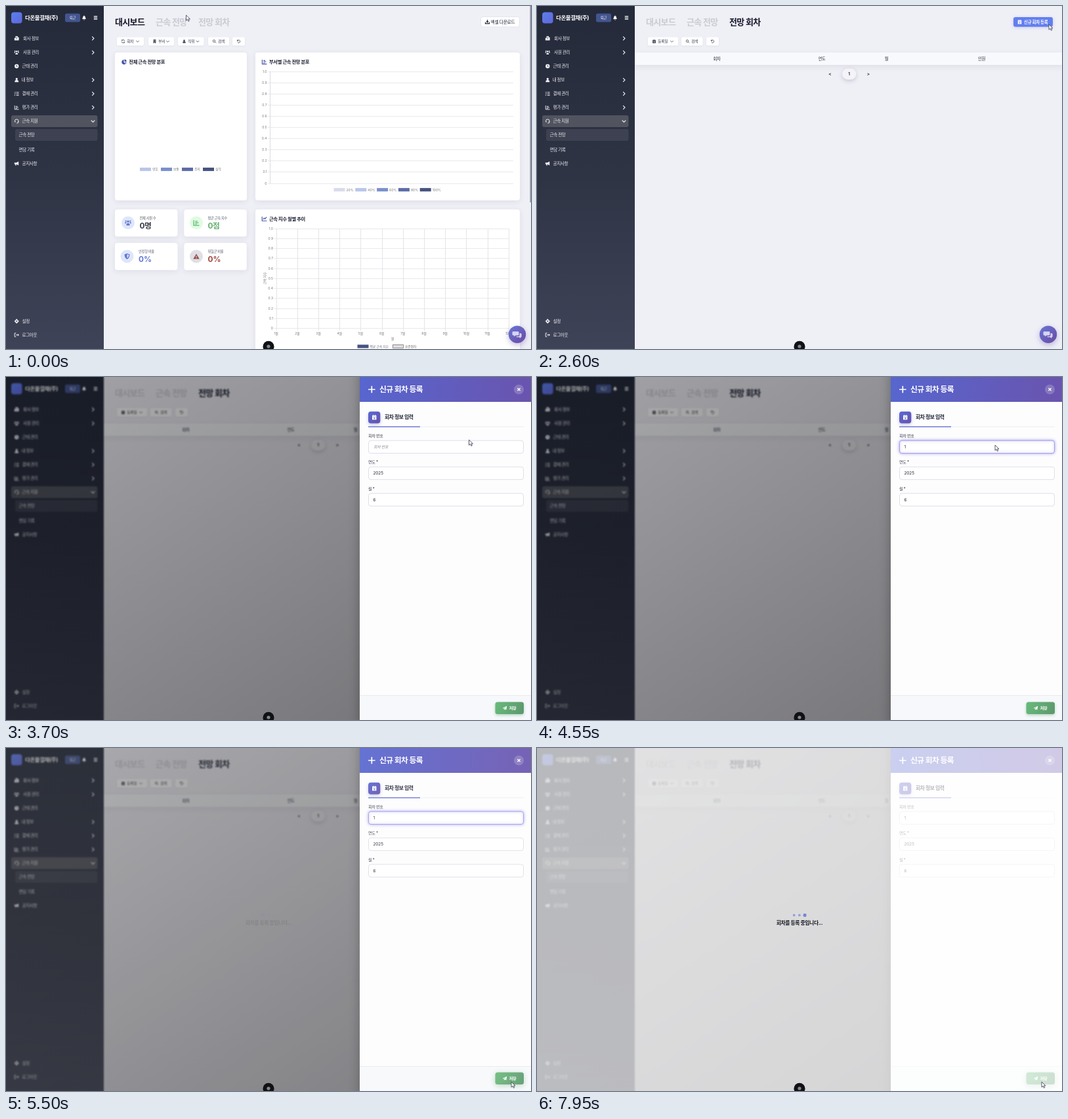
Write an HTML page with a canvas that moves like this. It is 800 by 524 pixels and loops after 8000 ms.

```html
<!DOCTYPE html>
<html lang="ko">
<head>
<meta charset="utf-8">
<style>
html, body { margin: 0; width: 100%; height: 100%; overflow: hidden; background: #efeff6 }
canvas { display: block }
</style>
</head>
<body>
<canvas id="stage" width="800" height="524"></canvas>
<script>
const W = 800, H = 524, LOOP = 8000;
const screen2d = document.getElementById('stage').getContext('2d');
const page2d = new OffscreenCanvas(W, H).getContext('2d');
let c = screen2d;

// ---- drawing helpers ----
const FONT = 'Inter, "Noto Sans CJK KR", "Noto Sans CJK", sans-serif';
const clamp = v => Math.max(0, Math.min(1, v));
const ramp = (t, a, b) => clamp((t - a) / (b - a));
const easeOut = p => 1 - (1 - p) ** 3;
const easeInOut = p => p * p * (3 - 2 * p);

function text(s, x, y, size, color, weight = 400, align = 'left', style = '', font = FONT) {
  c.font = `${style} ${weight} ${size}px ${font}`;
  c.letterSpacing = /[가-힣]/.test(s) ? `${-size * .05}px` : '0px';
  c.textAlign = align;
  c.fillStyle = color;
  c.fillText(s, x, y + size * .37);
}
function shadow(color, blur, dy) {
  c.shadowColor = color; c.shadowBlur = blur; c.shadowOffsetY = dy;
}
const noShadow = () => shadow('transparent', 0, 0);
function box(x, y, x2, y2, r, fill, stroke) {
  c.beginPath();
  c.roundRect(x, y, x2 - x, y2 - y, r);
  if (fill) { c.fillStyle = fill; c.fill(); }
  if (stroke) { c.strokeStyle = stroke; c.lineWidth = 1; c.stroke(); }
}
function raised(x, y, x2, y2, r, fill, color = 'rgba(40,45,90,.1)', blur = 8, dy = 2) {
  shadow(color, blur, dy);
  box(x, y, x2, y2, r, fill);
  noShadow();
}
function circle(x, y, r, fill) {
  c.beginPath(); c.arc(x, y, r, 0, 7); c.fillStyle = fill; c.fill();
}
function line(x, y, x2, y2, color, width = 1) {
  c.beginPath(); c.moveTo(x, y); c.lineTo(x2, y2);
  c.strokeStyle = color; c.lineWidth = width; c.stroke();
}
function gradient(x, y, x2, y2, ...colors) {
  const g = c.createLinearGradient(x, y, x2, y2);
  colors.forEach((col, i) => g.addColorStop(i / (colors.length - 1), col));
  return g;
}

// ---- icons, each in a box of 8 by 8 around its centre ----
const disc = (x, y, r) => `M${x - r} ${y}a${r} ${r} 0 1 0 ${2 * r} 0a${r} ${r} 0 1 0 ${-2 * r} 0z`;
const FILLED = {
  office: 'M-4-1h2v-3h4v2h2v5.5h-8zM-1-2.5h2v1h-2zM-1 0h2v1h-2z',
  tower: 'M-2.7-4h5.4v8h-5.4zM-1.4-2.5h1v1h-1zM.5-2.5h1v1h-1zM-1.4-.4h1v1h-1zM.5-.4h1v1h-1zM-.7 2h1.4v2h-1.4z',
  users: disc(0, -1.8, 1.5) + disc(-3, -2.4, 1) + disc(3, -2.4, 1) + 'M-2.4 3.5a2.4 3 0 0 1 4.8 0zM-4.4 1a1.6 2 0 0 1 2.4-1.8l-.8 1.8zM4.4 1a1.6 2 0 0 0-2.4-1.8l.8 1.8z',
  clock: disc(0, 0, 3.7) + 'M-.5-2.4v2.8l1.8 1.2.5-.8-1.3-.9v-2.3z',
  user: disc(0, -1.9, 1.9) + 'M-3.5 3.7a3.5 3.6 0 0 1 7 0z',
  horn: 'M-4-1.5h3.5l4-2v7l-4-2h-.5l.6 2.3h-1.6l-.7-2.3h-1.3z',
  gear: disc(0, 0, 3) + disc(0, 0, 1.2) + 'M-.8-4h1.6v1.2h-1.6zM-.8 2.8h1.6v1.2h-1.6zM-4-.8h1.2v1.6h-1.2zM2.8-.8h1.2v1.6h-1.2z',
  bell: 'M-3.5 2.4q1.2-1 1.2-3a2.3 2.6 0 0 1 4.6 0q0 2 1.2 3zM-1 3h2a1 1 0 0 1-2 0zM-.5-4h1v1h-1z',
  pie: 'M-.5-3.5v4l3 2.8a3.9 3.9 0 1 1-3-6.8zM.6-4a3.8 3.8 0 0 1 3.4 3.8h-3.4zM.9.8h3a4 4 0 0 1-1 2z',
  shield: 'M0-4l3.5 1.3q0 4.7-3.5 6.7q-3.5-2-3.5-6.7zM0-2.8v5.5q2.3-1.6 2.4-4.6z',
  warn: 'M0-3.6l4.2 7.2h-8.4zM-.5-1h1v2.4h-1zM-.5 2h1v.9h-1z',
  calendar: 'M-3.4-3h1.2v-1h1.1v1h2.2v-1h1.1v1h1.2v7h-6.8zM-2.4-1h4.8v.7h-4.8zM-.4.4h.8v.9h.9v.8h-.9v.9h-.8v-.9h-.9v-.8h.9z',
  plane: 'M4-4l-1.2 7.5-2.8-1.2-1.4 1.7v-2.5l4-4.3-4.8 3.8-1.8-.8z',
  bubbles: 'M-4-3h5a1 1 0 0 1 1 1v2.2a1 1 0 0 1-1 1h-2.6l-1.6 1.3v-1.3h-.8a1 1 0 0 1-1-1v-2.2a1 1 0 0 1 1-1zM2.7-1h1.1a1 1 0 0 1 1 1v2.2a1 1 0 0 1-1 1v1.2l-1.6-1.2h-2.2a1 1 0 0 1-.9-.9h2.4a1.2 1.2 0 0 0 1.2-1.2z'
};
const STROKED = {
  list: 'M-4-2.6l.8.8 1.3-1.5M-4 .2l.8.8 1.3-1.5M-4 3h1.5M-.6-2.5h4.6M-.6.3h4.6M-.6 3h4.6',
  chart: 'M-3.5-3.5v7h7.5M-1.5-2h3M-1.5 0h4.5M-1.5 1.8h2',
  trend: 'M-3.7-3.5v7h7.7M-2 1l1.6-2 1.6 1.2 2.4-3',
  headset: 'M-3.3 1v-1.2a3.3 3.3 0 0 1 6.6 0v1.7q0 2-2.5 2h-.8M-2.5 0v2M2.5 0v2',
  exit: 'M-1-3.2h-2.6v6.4h2.6M-1.5 0h5M1.7-2l2 2-2 2',
  menu: 'M-3.3-2.6h6.6M-3.3 0h6.6M-3.3 2.6h6.6',
  right: 'M-1.5-3.2l3.2 3.2-3.2 3.2',
  down: 'M-3.2-1.5l3.2 3.2 3.2-3.2',
  search: disc(-.7, -.7, 2.5) + 'M1.2 1.2l2.5 2.5',
  reset: 'M-3-3.5v2.5h2.5M-2.8-1.2a3.1 3.1 0 1 1 .4 3.2',
  reload: 'M3.3-.6a3.3 3.3 0 0 0-6-1.4M-3.3.6a3.3 3.3 0 0 0 6 1.4M-3-3.6v2h2M3 3.6v-2h-2',
  download: 'M0-3.8v5M-2-.8l2 2 2-2M-3.7 1v2.6h7.4v-2.6',
  cross: 'M-2.2-2.2l4.4 4.4M2.2-2.2l-4.4 4.4',
  plus: 'M-4 0h8M0-4v8'
};
function icon(name, x, y, size, color, width = 1.1) {
  c.save();
  c.translate(x, y);
  c.scale(size / 8, size / 8);
  c.fillStyle = c.strokeStyle = color;
  c.lineWidth = width;
  if (FILLED[name]) c.fill(new Path2D(FILLED[name]), 'evenodd');
  else c.stroke(new Path2D(STROKED[name]));
  c.restore();
}

// ---- page parts ----
function sidebar() {
  box(0, 0, 149, H, 0, gradient(0, 0, 0, H, '#242a3a', '#2f3445', '#3f4357'));
  box(8, 9.5, 24.5, 26.5, 4, gradient(8, 9, 24, 26, '#5a80ee', '#6068dc'));
  text('다온물결채(주)', 29, 18, 8.5, '#fff', 700);
  box(90, 11.5, 113, 24.5, 2.5, '#435590');
  text('퇴근', 101.5, 18, 5.2, '#fff', 500, 'center');
  icon('bell', 119, 18, 7, '#fff');
  icon('menu', 136.5, 18, 6.5, '#fff', 1.3);
  box(8, 167, 139.5, 185, 3, '#51545f');
  box(14, 188, 139.5, 206, 3, '#3d4151');
  const items = [
    ['office', '회사 정보', 49.5, 26, 'right'], ['users', '사원 관리', 71, 26, 'right'],
    ['clock', '근태 관리', 92, 24.5], ['user', '내 정보', 113, 23.5, 'right'],
    ['list', '결재 관리', 134, 24.5, 'right'], ['chart', '평가 관리', 155, 24.5, 'right'],
    ['headset', '근속 지원', 176, 24.5, 'down'], ['', '근속 전망', 197, 19.5],
    ['', '면담 기록', 219.5, 19.5], ['horn', '공지사항', 240.5, 24.5],
    ['gear', '설정', 481.5, 24.5], ['exit', '로그아웃', 502.5, 24.5]
  ];
  for (const [name, label, y, x, arrow] of items) {
    if (name) icon(name, 16.2, y, 6.8, '#f2f3f7');
    text(label, x, y, 6.5, '#f2f3f7', 500);
    if (arrow) icon(arrow, 132.5, y, 7, '#f2f3f7', 1.3);
  }
}
function tabs(active) {
  ['대시보드', '근속 전망', '전망 회차'].forEach((s, i) =>
    text(s, [166, 228, 293][i], 24, 13, i === active ? '#14182a' : '#cacbd2', 700));
}
function filterButton(x, x2, name, label, arrow) {
  raised(x, 47.5, x2, 60.5, 2, '#fff', 'rgba(40,45,90,.08)', 3, 1);
  icon(name, label ? x + 9.5 : (x + x2) / 2, 54, 5.5, '#33374a');
  if (label) text(label, x + 15.3, 54, 5.7, '#33374a', 500);
  if (arrow) icon('down', x2 - 9.5, 54, 5.5, '#33374a');
}
function cardTitle(name, label, x, y) {
  icon(name, x, y, 7.5, '#4353a8', 1.2);
  text(label, x + 7.3, y, 7.3, '#1d2133', 700);
}
function legend(colors, labels, x, y, step) {
  colors.forEach((color, i) => {
    box(x + i * step, y - 2.6, x + i * step + 17, y + 2.6, 0, color);
    text(labels[i], x + i * step + 19, y, 5, '#777');
  });
}
function yAxis(right, top, step, end) {
  for (let i = 0; i <= 10; i++) {
    const y = Math.round(top + i * step) + .5;
    line(right + 1, y, end, y, '#e9e9ee');
    text(i === 10 ? '0' : (1 - i / 10).toFixed(1), right - .5, y, 5, '#777', 400, 'right');
  }
}
function stat(x, y, cx, tint, name, color, label, value, valueColor) {
  raised(x, y, x + 95.5, y + 41.5, 4, '#fff');
  circle(cx, y + 20.5, 10, tint);
  icon(name, cx, y + 20.5, 9, color);
  text(label, cx + 17.6, y + 13.3, 5.2, '#555a66', 500);
  text(value, cx + 17.6, y + 25, 11.8, valueColor, 700);
}
function dashboard() {
  tabs(0);
  box(723.5, 16.5, 782.5, 32, 3, '#fff', '#e4e5ee');
  icon('download', 733.5, 24, 6.5, '#1d2133', 1.4);
  text('엑셀 다운로드', 738.5, 24, 6.8, '#1d2133', 500);
  filterButton(169, 210, 'reload', '회차', true);
  filterButton(217, 256, 'tower', '부서', true);
  filterButton(262, 301.5, 'user', '직위', true);
  filterButton(308, 340, 'search', '검색');
  filterButton(345, 364, 'reset');

  const blues = ['#d9dbeb', '#b9c6e9', '#7a90cb', '#5c6ca8', '#46527f'];
  raised(166, 71, 367, 297, 4, '#fff');
  cardTitle('pie', '전체 근속 전망 분포', 180, 85.3);
  legend(blues.slice(1), ['양호', '보통', '주의', '심각'], 204, 249.5, 32);

  raised(380, 71, 783, 297, 4, '#fff');
  cardTitle('chart', '부서별 근속 전망 분포', 393.7, 85.3);
  yAxis(398, 100, 17.05, 773);
  line(402.5, 100, 402.5, 271, '#dcdce2');
  legend(blues, ['20%', '40%', '60%', '80%', '100%'], 499.5, 280.7, 32.8);

  stat(166, 310.7, 186, '#dfe6f8', 'users', '#5f78d6', '전체 사원 수', '0명', '#3a3d48');
  stat(271.3, 310.7, 290, '#dffbe2', 'chart', '#5fb56c', '평균 근속 지수', '0점', '#66b070');
  stat(166, 362, 184.5, '#dfe6f8', 'shield', '#5f78d6', '안정형 비율', '0%', '#5f78d6');
  stat(271.3, 362, 290, '#e0dfe5', 'warn', '#96504c', '위험군 비율', '0%', '#a04a45');

  raised(380, 310.7, 783, 560, 4, '#fff');
  cardTitle('trend', '근속 지수 월별 추이', 393.7, 325);
  yAxis(407.5, 339.5, 15.25, 767);
  for (let m = 0; m < 12; m++) {
    const x = 411.5 + m * 32.2;
    line(Math.round(x) + .5, 340, Math.round(x) + .5, 496, '#e4e4ea');
    text(m + 1 + '월', x, 500, 5, '#777', 400, 'center');
  }
  text('월', 589, 508.5, 5, '#777', 400, 'center');
  c.save();
  c.translate(394, 416);
  c.rotate(-Math.PI / 2);
  text('근속 지수', 0, 0, 5, '#777', 400, 'center');
  c.restore();
  legend(['#46527f', '#e0e0e2'], ['평균 근속 지수', '표준편차'], 535.5, 520, 53.5);
  box(589.3, 517.6, 605.7, 522.6, 0, null, '#8a8a8e');
  box(798.5, 0, 800, 300, 0, '#8c90a3');
}
function rounds(hover) {
  tabs(2);
  raised(726, 17, 786, 31.7, 3, hover ? '#637fee' : '#4d5bd8', 'rgba(70,80,200,.25)', 5, 1);
  icon('calendar', 735.5, 24.2, 6.5, '#fff');
  text('신규 회차 등록', 742, 24.2, 6.5, '#fff', 700);
  filterButton(169, 215, 'calendar', '등록일', true);
  filterButton(220, 252.5, 'search', '검색');
  filterButton(258, 277, 'reset');
  raised(149, 71, 801, 90, 0, '#f8f9fc', 'rgba(40,45,90,.09)', 10, 3);
  [['회차', 274], ['연도', 434], ['월', 532.5], ['인원', 677.5]].forEach(([s, x]) =>
    text(s, x, 80.5, 6.4, '#2b2f40', 500, 'center'));
  raised(465, 95.5, 486.5, 112.5, 8.5, '#f3f3f8', 'rgba(40,45,90,.22)', 6, 2);
  [['<', 446.5], ['1', 475.7], ['>', 505]].forEach(([s, x]) =>
    text(s, x, 104, 6.5, '#1d2133', 600, 'center'));
}
function chatButton() {
  shadow('rgba(80,70,170,.35)', 9, 3);
  circle(779, 501.7, 13.2, gradient(768, 490, 790, 514, '#6874d4', '#6c4ca2'));
  noShadow();
  icon('bubbles', 778.7, 501.5, 11.5, '#d5d5f3');
}
function drawPage(t) {
  box(0, 0, W, H, 0, '#efeff6');
  if (t < 700) dashboard();
  else rounds(t > 2200);
  sidebar();
  chatButton();
}

// ---- registration panel ----
function field(label, y, value, focused, hint) {
  text(label, 552, y - 17, 6.1, '#3a3e4c', 500);
  if (focused) shadow('rgba(110,100,230,.55)', 4, 0);
  box(552.5, y - 9.7, 788.5, y + 9.7, 3.5, '#fff', focused ? '#a09ce8' : '#dcdfe9');
  noShadow();
  if (value) text(value, 559.5, y, 6.3, '#22252f');
  else text(hint, 560, y, 6, '#8c8f99', 400, 'left', 'italic');
}
function panel(t) {
  raised(539, -10, 801, H + 10, 0, '#fdfdfe', 'rgba(0,0,0,.3)', 16, 0);
  box(539, 0, 800, 38, 0, gradient(539, 0, 800, 38, '#5766cf', '#6a54ae'));
  icon('plus', 557.3, 19, 10.5, '#fff', 1.3);
  text('신규 회차 등록', 569, 19, 11.8, '#fff', 700);
  circle(781.5, 19, 7.6, 'rgba(255,255,255,.2)');
  icon('cross', 781.5, 19, 7.5, '#fff', 1.4);

  raised(552, 52.7, 570.3, 70.7, 4, gradient(552, 53, 570, 71, '#5a69d0', '#6551ad'), 'rgba(90,90,200,.35)', 5, 2);
  icon('calendar', 561.2, 61.6, 7.5, '#fff');
  text('회차 정보 입력', 577, 61.6, 7.8, '#1d2133', 700);
  line(552, 76, 789, 76, '#ebecf2');
  line(552, 76, 631, 76, '#6f7bd3', 1.4);
  field('회차 번호', 106.8, t > 4550 ? '1' : '', t > 3950 && t < 5560, '회차 번호');
  field('연도 *', 147, '2025');
  field('월 *', 187.5, '6');

  box(539, 486, 800, H, 0, '#f7f8fb');
  line(539, 486.5, 800, 486.5, '#e8eaf0');
  const lift = ramp(t, 5220, 5380);
  c.save();
  c.translate(0, -lift);
  raised(745.5, 496.5, 789, 515, 3.5, gradient(745, 496, 789, 515, '#69bb7b', '#5c976d'), 'rgba(70,150,90,.35)', 4 + 4 * lift, 2);
  icon('plane', 760, 505.7, 6.5, '#fff');
  text('저장', 766.7, 505.7, 6.2, '#fff', 700);
  c.restore();
}

// ---- loading layer ----
function loading(t, alpha) {
  c.save();
  c.globalAlpha = alpha;
  box(0, 0, W, H, 0, 'rgba(255,255,255,.69)');
  for (let i = 0; i < 3; i++) {
    const phase = (((t - 6475 - i * 200) % 1000) + 1500) % 1000 - 500;
    const pulse = easeInOut(clamp(1 - Math.abs(phase) / 300));
    c.globalAlpha = alpha * (.65 + .35 * pulse);
    circle(391.7 + i * 8.2, 255.4, 1.9 + .8 * pulse, '#7183d0');
  }
  c.globalAlpha = alpha;
  text('회차를 등록 중입니다...', 400, 267, 7.8, '#14161f', 700, 'center');
  c.restore();
}

// ---- pointer ----
const STOPS = [ // time, x, y
  [0, 274.5, 14], [150, 274.5, 14], [600, 317, 24], [1450, 317, 24], [2250, 780, 28],
  [3200, 780, 28], [3700, 705.5, 96], [3900, 698, 104], [4800, 698, 104],
  [5330, 770, 510], [7700, 770, 510], [7900, 769, 510], [LOOP, 769, 510]
];
function pointerAt(t) {
  const i = Math.max(1, STOPS.findIndex(s => s[0] > t));
  const [t0, x0, y0] = STOPS[i - 1], [t1, x1, y1] = STOPS[i];
  const p = easeInOut(ramp(t, t0, t1));
  return [x0 + (x1 - x0) * p, y0 + (y1 - y0) * p];
}
const ARROW = new Path2D('M0 0v8.2l2-1.8 1.4 3 1.4-.7-1.4-2.8h2.6z');
const HAND = new Path2D('M-.8 1a.9.9 0 0 1 1.8 0v3l3 .7q1 .3.9 1.5l-.5 3.8h-4.4l-2.6-3.4q-.4-1 .6-1l1.2.7z');
function pointer(t) {
  const [x, y] = pointerAt(t);
  c.save();
  c.translate(x, y);
  const shape = x > 291 && x < 342 && y < 32 ? HAND : ARROW;
  c.fillStyle = '#fff';
  c.strokeStyle = '#33364a';
  c.lineWidth = .8;
  c.fill(shape);
  c.stroke(shape);
  c.restore();
}

function draw(t) {
  c = page2d;
  drawPage(t);
  c = screen2d;
  c.drawImage(page2d.canvas, 0, 0);

  const open = easeOut(ramp(t, 2700, 3080));
  if (open > 0) {
    c.save();
    c.globalAlpha = open;
    c.filter = 'blur(1.2px)';
    c.drawImage(page2d.canvas, 0, 0);
    c.filter = 'none';
    box(0, 0, W, H, 0, gradient(131, -138, 669, 662, 'rgba(0,0,0,.3)', 'rgba(0,0,0,.54)'));
    c.restore();
    c.save();
    c.translate(262 * (1 - open), 0);
    panel(t);
    c.restore();
  }
  const busy = ramp(t, 5480, 5660);
  if (busy > 0) loading(t, busy);

  if (t > 450 && t < 1650) {
    box(0, 513, 120, H, [0, 2, 0, 0], '#c5eef2');
    text('localhost:5173/retention/prospect-rounds', 0, 518.7, 6, '#2c4a55', 400, 'left', '', '"Open Sans", sans-serif');
  }
  circle(400, 520.3, 8.5, '#101114');
  circle(400, 520, 2.6, '#85878c');
  pointer(t);
}

const start = performance.now();
function tick() {
  draw((performance.now() - start) % LOOP);
  requestAnimationFrame(tick);
}
tick();
</script>
</body>
</html>
```
